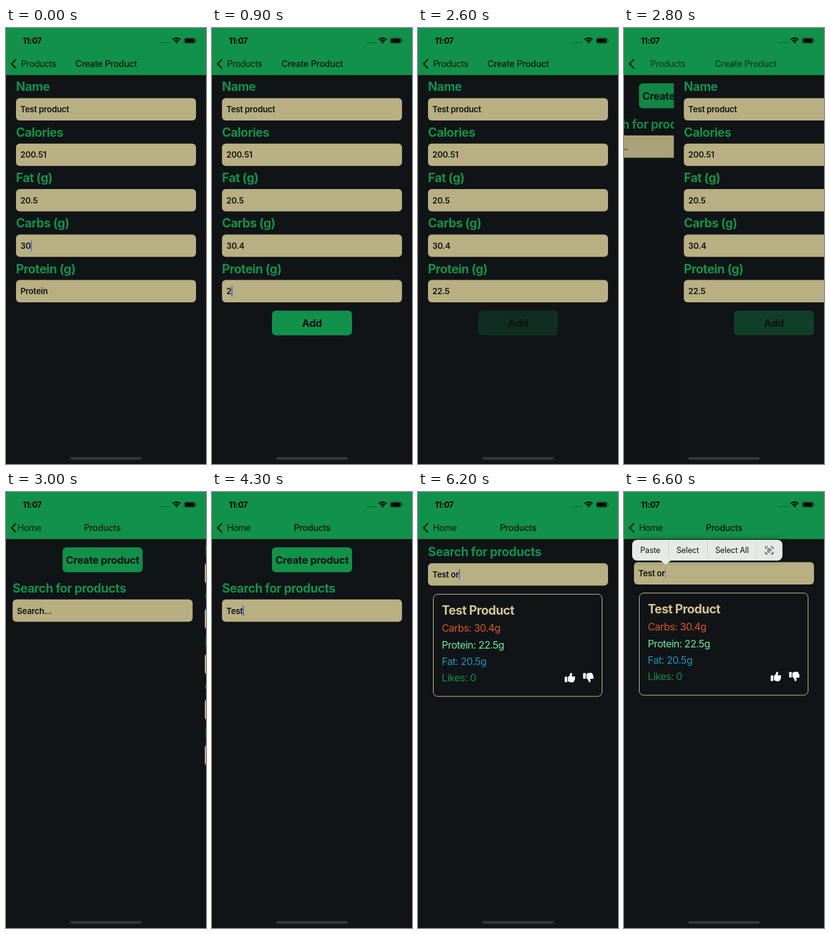
Animation of 320 by 693 pixels, one loop 6.7 s. Source, as an HTML page with a canvas:

```html
<!DOCTYPE html>
<html lang="en">
<head>
<meta charset="utf-8">
<title>Create Product</title>
<style>
  html, body { margin: 0; width: 100%; height: 100%; overflow: hidden; background: #101416; }
  canvas { display: block; width: 320px; height: 693px; }
</style>
</head>
<body>
<canvas id="stage"></canvas>
<script>
const W = 320, H = 693, LOOP = 6700;
const BG = '#101417', GREEN = '#12914a', SAND = '#b8b082', INK = '#0e1214';
const canvas = document.getElementById('stage');
const dpr = window.devicePixelRatio || 1;
canvas.width = W * dpr;
canvas.height = H * dpr;
const c = canvas.getContext('2d');

const clamp = v => Math.max(0, Math.min(1, v));
const ease = v => v < 0.5 ? 2 * v * v : 1 - 2 * (1 - v) * (1 - v);
const mix = (a, b, v) => a + (b - a) * v;

// Critically damped spring, 0 to 1
function spring(ms, rate = 18.2) {
  const x = Math.max(0, ms) / 1000 * rate;
  return 1 - (1 + x) * Math.exp(-x);
}

function setFont(size, weight, gap = 0) {
  c.font = `${weight} ${size}px Inter, "Liberation Sans", sans-serif`;
  c.letterSpacing = gap + 'px';
}

function text(str, x, y, size, weight, color, gap = 0, align = 'left') {
  setFont(size, weight, gap);
  c.textAlign = align;
  c.fillStyle = color;
  c.fillText(str, x, y);
  return c.measureText(str).width;
}

function box(x, y, w, h, r, color) {
  c.beginPath();
  c.roundRect(x, y, w, h, r);
  c.fillStyle = color;
  c.fill();
}

function faded(alpha, draw) {
  c.save();
  c.globalAlpha *= alpha;
  draw();
  c.restore();
}

function stroke(path, width, color) {
  c.lineWidth = width;
  c.strokeStyle = color;
  c.lineCap = c.lineJoin = 'round';
  c.stroke(new Path2D(path));
}

const heading = (str, y, color = GREEN, x = 16) => text(str, x, y, 19.6, 700, color, -0.45);

function field(y, str, caret = 0, mark = '') {
  box(16, y, 288, 35.5, 6, SAND);
  setFont(13.2, 600, -0.22);
  if (mark) {
    const from = 23 + c.measureText(str.slice(0, -mark.length)).width;
    const wide = c.measureText(mark).width;
    box(from - 1, y + 8.5, wide + 2, 18.5, 1, '#929a86');
  }
  const end = 23 + text(str, 23, y + 22.7, 13.2, 600, INK, -0.22);
  if (caret) faded(caret, () => box(end, y + 9, 1.7, 17.5, 0.8, '#4a67cf'));
}

// The label matches the page colour, so only the plate fades
function button(str, y, alpha = 1) {
  faded(alpha, () => box(96, y, 128, 39.4, 6, GREEN));
  text(str, 160, y + 25.6, 16.5, 700, INK, -0.25, 'center');
}

// Typed text: the last entry whose time has passed
function typed(t, steps) {
  let value = steps[0][1];
  for (const [at, str] of steps) if (t >= at) value = str;
  return value;
}

function createPage(t) {
  const carbs = typed(t, [[0, '30'], [100, '30.'], [200, '30.4']]);
  const protein = typed(t, [[0, 'Protein'], [900, '2'], [1500, '22'], [1600, '22.'], [1700, '22.5']]);
  const rows = [
    ['Name', 'Test product'], ['Calories', '200.51'], ['Fat (g)', '20.5'],
    ['Carbs (g)', carbs, t < 800], ['Protein (g)', protein, t >= 900 && t < 2400]
  ];
  rows.forEach(([label, value, caret], i) => {
    const y = 111.4 + i * 72.3;
    heading(label, y - 11);
    field(y, value, Number(caret || 0));
  });
  if (t < 900) return;
  const press = ease(clamp((t - 2350) / 150)), release = ease(clamp((t - 2727) / 250));
  button('Add', 449.2, mix(mix(1, 0.2, press), 1, release));
}

function thumb(x, y, flip) {
  c.save();
  c.translate(x, y);
  if (flip) c.scale(1, -1);
  box(-8.3, -1.6, 4.2, 8.8, 1, '#fff');
  c.fill(new Path2D('M-3 -.9 C-.7 -2.7 .2 -4.3 .5 -6.2 C.8 -8.3 3.7 -7.7 3.6 -5.2 ' +
    'C3.6 -4 3.1 -3 2.6 -2 H6.6 C8.8 -2 8.9 .4 7.7 .9 C8.8 1.6 8.4 3.2 7.2 3.5 ' +
    'C7.8 4.4 7.2 5.6 6.2 5.7 C6.5 7 5.6 7.5 4.4 7.5 H1.5 C-.6 7.5 -1.5 6.5 -3 5.8 Z'));
  c.restore();
}

function card(y) {
  c.beginPath();
  c.roundRect(24.5, y, 270, 162.4, 7);
  c.lineWidth = 1;
  c.strokeStyle = '#cbbf8c';
  c.stroke();
  heading('Test Product', y + 32.6, '#d3c693', 38);
  const lines = [['Carbs: 30.4g', '#dd5526'], ['Protein: 22.5g', '#6be79c'],
                 ['Fat: 20.5g', '#1f92b8'], ['Likes: 0', '#168a49']];
  lines.forEach(([str, color], i) => text(str, 38, y + 59.8 + i * 26.3, 16.3, 400, color, -0.55));
  thumb(243, y + 132.6);
  thumb(272.5, y + 132.6, true);
}

function productsPage(t) {
  const scroll = 59.4 * spring(t - 5960, 22);
  c.save();
  c.translate(0, -scroll);
  button('Create product', 88);
  heading('Search for products', 159.5);
  const query = typed(t, [[0, 'Search...'], [4000, 'T'], [4100, 'Te'], [4200, 'Tes'], [4300, 'Test'],
    [4500, 'Test '], [4600, 'Test p'], [4700, 'Test pr'], [6000, 'Test or']]);
  const caret = t < 3900 ? 0 : 1 - 0.6 * clamp((t - 6400) / 150);
  field(170.8, query, caret, t >= 4800 && t < 6000 ? 'pr' : '');
  if (t >= 6000) faded(clamp((t - 5950) / 150), () => card(220));
  c.restore();
}

function statusBar() {
  text('11:07', 27, 25, 13, 700, '#000', -0.3);
  for (let i = 0; i < 4; i++) box(248 + i * 4, 22.3, 2.6, 2.2, 0.8, '#0b6a36');
  // Wi-Fi fan
  c.strokeStyle = '#000';
  c.lineCap = 'butt';
  for (const [r, w] of [[8.8, 2], [5.5, 2], [1.5, 3]]) {
    c.beginPath();
    c.arc(273, 24.8, r, -Math.PI * 0.75, -Math.PI * 0.25);
    c.lineWidth = w;
    c.stroke();
  }
  c.beginPath();
  c.roundRect(284.6, 15.4, 18.8, 9.4, 2.8);
  c.lineWidth = 0.9;
  c.strokeStyle = '#0a6032';
  c.stroke();
  box(286, 16.8, 16, 6.6, 1.7, '#000');
  box(304.2, 18.4, 1.2, 3.4, 0.6, '#0a6032');
}

const navText = (str, x, alpha, weight = 400, gap = -0.4) =>
  faded(alpha, () => text(str, x, 62, 14.1, weight, '#07140c', gap));

function navBar(p) {
  c.fillStyle = GREEN;
  c.fillRect(0, 0, W, 74.8);
  statusBar();
  stroke('M15.6 50.3 L8.8 57 L15.6 63.7', 1.9, '#07140c');
  if (p < 1) navText('Create Product', 111 + 138 * p, clamp(1 - p * 1.2), 500, -0.2);
  // The back label trails the page, then settles as the title
  const lag = p - 0.565 * p * (1 - p) * (1 - p);
  const [weight, gap] = p < 0.5 ? [400, -0.4] : [500, -0.2];
  navText('Products', mix(24, 131, lag), 1 - 0.35 * Math.sin(Math.PI * p), weight, gap);
  if (p > 0) navText('Home', mix(-76, 24, p), clamp((p - 0.4) / 0.58));
}

function menu() {
  c.save();
  c.shadowColor = 'rgba(0,0,0,.35)';
  c.shadowBlur = 10 * dpr;
  box(13, 76, 240.5, 33, 8, '#e6eae6');
  c.restore();
  c.fillStyle = '#e6eae6';
  c.fill(new Path2D('M56 108.5 C61 109 63.5 115 66.5 115 C69.5 115 72 109 77 108.5 Z'));
  c.fillStyle = '#cfd4d0';
  for (const x of [71, 133, 211.5]) c.fillRect(x, 76, 0.9, 33);
  text('Paste', 26, 97, 12.5, 400, '#111', -0.15);
  text('Select', 84, 97, 12.5, 400, '#111', -0.15);
  text('Select All', 146, 97, 12.5, 400, '#111', -0.15);
  stroke('M226.5 90 V89 Q226.5 87 228.5 87 H229.5 M235.5 87 H236.5 Q238.5 87 238.5 89 V90 ' +
    'M238.5 95.5 V96.5 Q238.5 98.5 236.5 98.5 H235.5 M229.5 98.5 H228.5 Q226.5 98.5 226.5 96.5 V95.5 ' +
    'M229.5 90.3 H235 M229.5 92.8 H236 M229.5 95.3 H233.5', 1.1, '#111');
}

function draw(t) {
  c.setTransform(dpr, 0, 0, dpr, 0, 0);
  c.fillStyle = BG;
  c.fillRect(0, 0, W, H);
  const p = t >= 3400 ? 1 : spring(t - 2748.3);

  if (p > 0) {
    c.save();
    c.translate(-96 * (1 - p), 0);
    productsPage(t);
    c.restore();
  }
  if (p < 1) {
    c.save();
    if (p > 0) {
      c.fillStyle = `rgba(0,0,0,${0.1 * (1 - p)})`;
      c.fillRect(0, 0, W * p, H);
    }
    c.translate(W * p, 0);
    c.fillStyle = BG;
    c.fillRect(0, 0, W, H);
    createPage(t);
    c.restore();
  }

  navBar(p);
  if (t >= 6400) faded(clamp((t - 6340) / 220), menu);
  box(103, 682, 114, 4.3, 2.1, '#35383a');
}

const start = performance.now();
function frame() {
  draw((performance.now() - start) % LOOP);
  requestAnimationFrame(frame);
}
frame();
</script>
</body>
</html>
```
